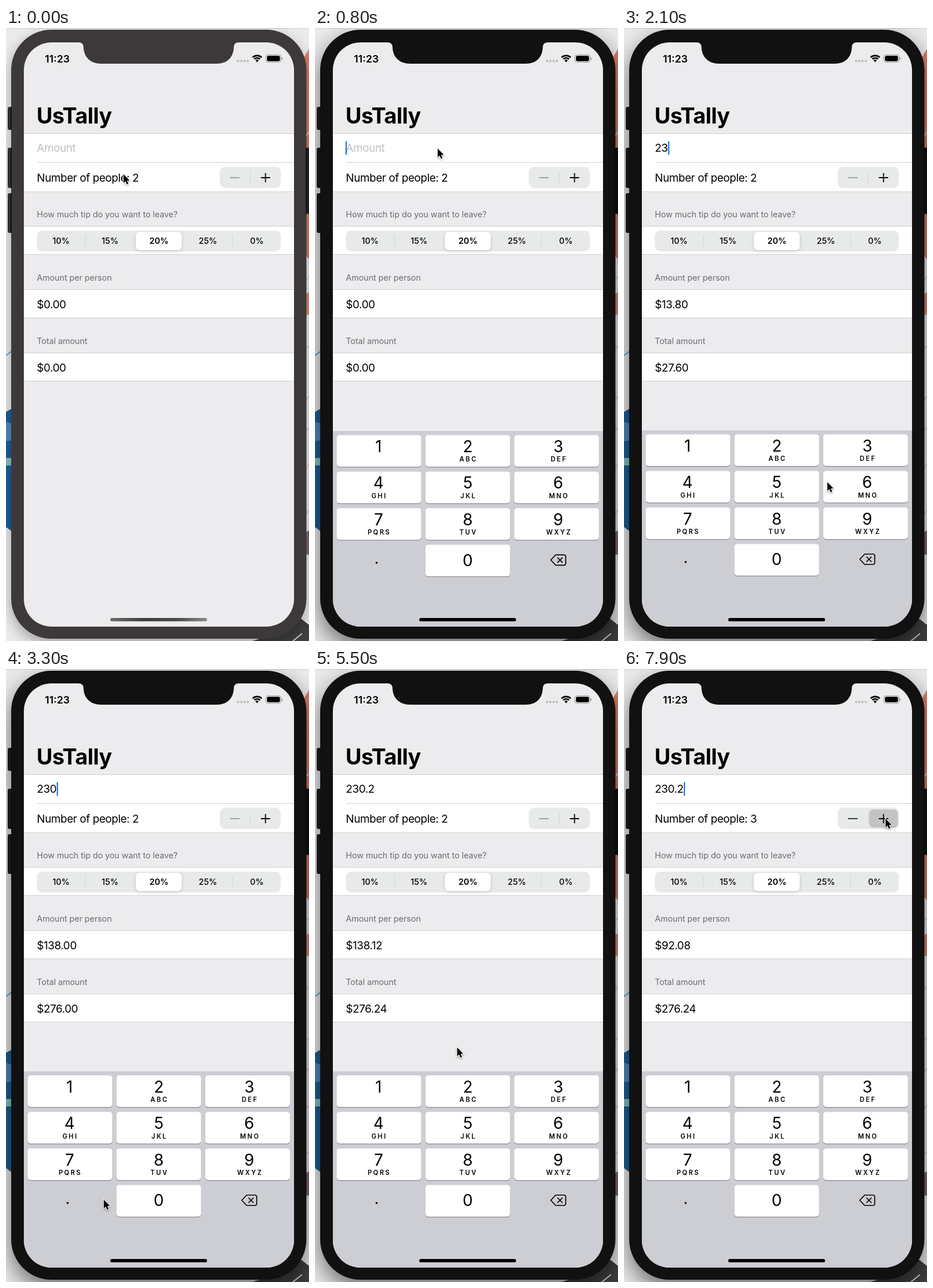
An HTML page with a canvas that plays this animation: 526 px wide and 1065 px high, repeating every 8 s.

```html
<!DOCTYPE html>
<html lang="en">
<head>
<meta charset="utf-8">
<title>Bill calculator</title>
<style>
  html, body { margin: 0; width: 100%; height: 100%; overflow: hidden; background: #d6d7d9; }
  canvas { display: block; }
</style>
</head>
<body>
<canvas id="stage" width="526" height="1065"></canvas>
<script>
const ctx = document.getElementById('stage').getContext('2d');
const LOOP = 8000, STEP = 100;
const LEFT = 31, RIGHT = 500, TOP = 25, BOTTOM = 1040;
const FOCUS = 200, KEYBOARD_START = 375.5, PLUS_DOWN = 7700, PLUS_UP = 7800;

// Pointer stops: time, x, y
const pointerPath = [
  [0, 204, 254], [200, 213, 209.5], [900, 213, 209.5], [1300, 250, 740], [1450, 250, 740],
  [1700, 392, 742], [1900, 392, 742], [2100, 353, 789], [2700, 262, 922], [2900, 262, 922],
  [3600, 110, 922], [4000, 110, 922], [4500, 214.5, 730.5], [5200, 214.5, 730.5],
  [6400, 421, 264], [6600, 421, 264], [7100, 454, 260]
];
const taps = [
  { key: '2', down: 1300, up: 1500 },
  { key: '3', down: 1700, up: 1900 },
  { key: '0', down: 2700, up: 2900 },
  { key: '.', down: 3800, up: 4000 },
  { key: '2', down: 4600, up: 4700 }
];
const clicks = [{ down: FOCUS, up: 300 }, ...taps, { down: PLUS_DOWN, up: PLUS_UP }];
const pad = [['1', ''], ['2', 'ABC'], ['3', 'DEF'], ['4', 'GHI'], ['5', 'JKL'], ['6', 'MNO'],
  ['7', 'PQRS'], ['8', 'TUV'], ['9', 'WXYZ'], ['.', ''], ['0', ''], ['back', '']];
const padLabelX = [110.3, 265.2, 422.3];

const isHeld = (tap, t) => t >= tap.down && t < tap.up;
const clamp = v => Math.max(0, Math.min(1, v));

function text(str, x, y, size, { weight = 400, color = '#000', align = 'left', track = 0 } = {}) {
  ctx.font = `${weight} ${size}px Inter, "Open Sans", sans-serif`;
  ctx.letterSpacing = track + 'px';
  ctx.textAlign = align;
  ctx.fillStyle = color;
  ctx.fillText(str, x, y);
  return ctx.measureText(str).width;
}
const bodyText = (str, y, color) => text(str, 53.5, y, 19, { color, track: -0.42 });

function box(x, y, w, h, color, r = 0) {
  ctx.fillStyle = color;
  ctx.beginPath();
  ctx.roundRect(x, y, w, h, r);
  ctx.fill();
}

function line(points, color, width = 1, close = false) {
  ctx.strokeStyle = color;
  ctx.lineWidth = width;
  ctx.beginPath();
  points.forEach(([x, y]) => ctx.lineTo(x, y));
  if (close) ctx.closePath();
  ctx.stroke();
}

function poly(points, color) {
  ctx.fillStyle = color;
  ctx.beginPath();
  points.forEach(([x, y]) => ctx.lineTo(x, y));
  ctx.fill();
}

function pointerAt(t) {
  const next = pointerPath.findIndex(p => p[0] > t);
  if (next < 0) return pointerPath.at(-1).slice(1);
  const [t0, x0, y0] = pointerPath[next - 1], [t1, x1, y1] = pointerPath[next];
  const u = (t - t0) / (t1 - t0), e = u * u * (3 - 2 * u);
  return [x0 + (x1 - x0) * e, y0 + (y1 - y0) * e];
}

// Critically damped spring
function keyboardTop(t) {
  const k = Math.max(0, t - KEYBOARD_START) / 1000 * 18.26;
  return 699 + (BOTTOM - 699) * (1 + k) * Math.exp(-k);
}

function caretAlpha(t) {
  if (t < FOCUS + 100) return 0;
  const lastEdit = taps.reduce((a, tap) => tap.up <= t ? tap.up : a, FOCUS + 100);
  if (t - lastEdit <= 600) return 1;
  const p = t % 1000;
  return p < 500 ? clamp((500 - p) / 300) : clamp((p - 600) / 300);
}

function drawDesktop() {
  box(0, 0, 526, 1065, '#ebebed');
  box(0, 0, 526, 1.5, '#d3dce4');
  line([[0, 569], [12, 560]], '#4fa9c8', 2);
  poly([[0, 667], [12, 660], [12, 876], [0, 867]], '#1b6099');
  poly([[0, 684], [12, 688], [12, 716], [0, 718]], '#4d8ac2');
  box(0, 747, 12, 13, '#86c3c6');
  poly([[526, 36], [512, 60], [512, 196], [526, 180]], '#dd7d63');
  poly([[526, 182], [512, 200], [512, 385], [526, 402]], '#d57a62');
  poly([[526, 459], [515, 466], [515, 500], [526, 498]], '#dc8a74');
  for (const y of [432, 552, 640, 694, 758, 838]) line([[518, y + 10], [526, y]], '#9d9da0');
  poly([[526, 873], [512, 880], [512, 914], [526, 915]], '#806971');
  poly([[428, 1065], [480, 1048], [512, 1026], [526, 1037], [526, 1065]], '#403f41');
  line([[498, 1065], [514, 1052]], '#d5d5d5', 2);
}

function drawPhone(active) {
  const shell = active ? '#111112' : '#3d393a';
  ctx.save();
  ctx.shadowColor = active ? 'rgba(0,0,0,.55)' : 'rgba(0,0,0,.32)';
  ctx.shadowBlur = active ? 40 : 24;
  ctx.shadowOffsetY = active ? 16 : 9;
  box(9, 3, 512.5, 1058, shell, 70);
  ctx.restore();
  const button = active ? '#19191a' : '#302e2f';
  for (const [y, h] of [[137, 40], [208, 70], [287, 69]]) {
    box(3, y, 7, h, button, [3, 0, 0, 3]);
    box(8, y, 1.5, h, '#0a0a0a');
  }
  box(520, 208, 6, 115, active ? '#0c0c0c' : '#1c1b1c');
  return shell;
}

function drawNotch(shell) {
  ctx.fillStyle = shell;
  ctx.beginPath();
  ctx.moveTo(126, 24);
  ctx.lineTo(126, 25);
  ctx.quadraticCurveTo(134, 25, 134.5, 33);
  ctx.bezierCurveTo(135, 51, 147, 62, 165, 62);
  ctx.lineTo(366, 62);
  ctx.bezierCurveTo(384, 62, 395, 51, 395.5, 33);
  ctx.quadraticCurveTo(396, 25, 404, 25);
  ctx.lineTo(404, 24);
  ctx.fill();
}

function drawStatus() {
  text('11:23', 89, 59.5, 17.8, { weight: 600, align: 'center' });
  for (let i = 0; i < 4; i++) box(401 + i * 5.6, 55.3, 4, 4, '#bcbcbe', 2);
  ctx.strokeStyle = '#000';
  ctx.lineWidth = 2.7;
  for (const r of [11.2, 7]) {
    ctx.beginPath();
    ctx.arc(436, 59, r, -Math.PI * 0.75, -Math.PI * 0.25);
    ctx.stroke();
  }
  ctx.fillStyle = '#000';
  ctx.beginPath();
  ctx.moveTo(436, 59.6);
  ctx.arc(436, 59, 4, -Math.PI * 0.75, -Math.PI * 0.25);
  ctx.fill();
  ctx.strokeStyle = '#98989a';
  ctx.lineWidth = 1.1;
  ctx.beginPath();
  ctx.roundRect(451, 46.5, 26.5, 13, 4);
  ctx.stroke();
  box(453, 48.3, 22.6, 9.4, '#000', 2.4);
  box(478.7, 51, 1.7, 4.5, '#98989a', [0, 2, 2, 0]);
}

function drawRow(y0, y1) {
  box(LEFT, y0, RIGHT - LEFT, y1 - y0, '#fff');
  for (const y of [y0, y1 - 1]) box(LEFT, y, RIGHT - LEFT, 1, '#cfcfd2');
}

function drawStepper(people, lit) {
  box(371, 241, 106, 37, '#e8eaea', 9);
  box(423.5, 250, 1, 19, '#d0d1d3');
  if (lit) box(425.5, 244, 50, 31.5, '#c3c3c5', 7);
  line([[389, 260], [405.5, 260]], people > 2 ? '#000' : '#87888a', 1.7);
  line([[442.5, 260], [458.5, 260]], '#000', 1.8);
  line([[450.5, 252], [450.5, 268]], '#000', 1.8);
}

function drawSegments() {
  box(53.5, 352, 423.5, 36, '#e8eaea', 9);
  for (const x of [137.5, 392.5]) box(x, 360, 1, 19, '#d0d1d3');
  ctx.save();
  ctx.shadowColor = 'rgba(0,0,0,.16)';
  ctx.shadowBlur = 6;
  ctx.shadowOffsetY = 2;
  box(225.5, 354, 79.5, 32, '#fff', 7);
  ctx.restore();
  ['10%', '15%', '20%', '25%', '0%'].forEach((label, i) =>
    text(label, 95.5 + i * 85, 375.2, 14.5, { weight: i === 2 ? 600 : 500, align: 'center', track: -0.1 }));
}

function drawForm(t) {
  const amount = taps.filter(tap => tap.up <= t).map(tap => tap.key).join('');
  const people = t >= PLUS_DOWN ? 3 : 2;
  const total = Number(amount) * 1.2;
  const money = v => '$' + v.toFixed(2);

  text('UsTally', 53, 166, 38, { weight: 700, track: -0.6 });
  [[183, 285], [344, 394], [454, 504], [564, 614]].forEach(r => drawRow(...r));
  box(54, 233, RIGHT - 54, 1, '#cfcfd2');

  const width = bodyText(amount || 'Amount', 215, amount ? '#000' : '#c0c0c2');
  ctx.globalAlpha = caretAlpha(t);
  box(amount ? 54 + width : 53, 196.5, 2.2, 24, '#1477e6', 1);
  ctx.globalAlpha = 1;

  bodyText('Number of people: ' + people, 267);
  drawStepper(people, t >= PLUS_DOWN);
  drawSegments();
  const heading = (str, y) => text(str, 53.5, y, 14.4, { color: '#6c6c70', track: -0.05 });
  heading('How much tip do you want to leave?', 329);
  heading('Amount per person', 439);
  heading('Total amount', 549);
  bodyText(money(total / people), 487);
  bodyText(money(total), 597);
}

function drawBackspace(x, y) {
  ctx.lineJoin = ctx.lineCap = 'round';
  line([[x - 13, y], [x - 4.5, y - 9], [x + 11, y - 9], [x + 13, y - 7], [x + 13, y + 7],
    [x + 11, y + 9], [x - 4.5, y + 9]], '#000', 1.7, true);
  line([[x - 1, y - 4], [x + 7, y + 4]], '#000', 1.7);
  line([[x + 7, y - 4], [x - 1, y + 4]], '#000', 1.7);
  ctx.lineJoin = 'miter';
  ctx.lineCap = 'butt';
}

function drawKeyboard(t) {
  const top = keyboardTop(t);
  if (top >= BOTTOM) return;
  box(LEFT, top, RIGHT - LEFT, BOTTOM - top, '#cdced3');
  pad.forEach(([digit, letters], i) => {
    const column = i % 3, mid = padLabelX[column];
    const x = 37.5 + column * 154.2, y = top + 7 + Math.floor(i / 3) * 63.5;
    const pressed = taps.some(tap => tap.key === digit && isHeld(tap, t));
    const plain = digit === '.' || digit === 'back';
    if (!plain || pressed) {
      box(x, y + 1.2, 147, 55, '#898a8e', 5);
      box(x, y, 147, 55, pressed && !plain ? '#b1b9cf' : '#fff', 5);
    }
    if (digit === '.') box(105.2, y + 29.5, 3.6, 3.6, '#000', 1.8);
    else if (digit === 'back') drawBackspace(mid, y + 26.5);
    else {
      text(digit, mid, y + (digit === '0' ? 36.8 : 29.7), 28, { align: 'center' });
      text(letters, mid + 1.3, y + 46, 11.2, { weight: 600, align: 'center', track: 2.5 });
    }
  });
}

function drawHomeBar(active) {
  let color = '#000';
  if (!active) {
    color = ctx.createLinearGradient(181, 0, 349, 0);
    color.addColorStop(0, '#6d6d6e');
    color.addColorStop(0.35, '#3d3d3e');
    color.addColorStop(0.7, '#4a4a4b');
    color.addColorStop(1, '#8b8d8c');
  }
  box(181, 1025, 168, 5.8, color, 3);
}

function drawPointer(t) {
  const [x, y] = pointerAt(t);
  if (clicks.some(c => isHeld(c, t))) {
    ctx.strokeStyle = '#0c0c0e';
    ctx.lineWidth = 1.6;
    ctx.beginPath();
    ctx.arc(x, y + 0.5, 24.6, 0, Math.PI * 2);
    ctx.stroke();
  }
  ctx.save();
  ctx.translate(x, y);
  ctx.beginPath();
  [[0, 0], [0, 15.2], [3.4, 12], [5.8, 17.6], [8.4, 16.5], [6, 11], [10.6, 10.8]]
    .forEach(p => ctx.lineTo(...p));
  ctx.closePath();
  ctx.shadowColor = 'rgba(0,0,0,.35)';
  ctx.shadowBlur = 3;
  ctx.shadowOffsetY = 1.5;
  ctx.strokeStyle = '#fff';
  ctx.lineWidth = 2;
  ctx.stroke();
  ctx.shadowColor = 'transparent';
  ctx.fillStyle = '#000';
  ctx.fill();
  ctx.restore();
}

function render(t) {
  const active = t >= FOCUS;
  drawDesktop();
  const shell = drawPhone(active);
  ctx.save();
  ctx.beginPath();
  ctx.roundRect(LEFT, TOP, RIGHT - LEFT, BOTTOM - TOP, 48);
  ctx.clip();
  box(LEFT, TOP, RIGHT - LEFT, BOTTOM - TOP, '#ececee');
  drawForm(t);
  drawKeyboard(t);
  drawStatus();
  drawHomeBar(t > KEYBOARD_START);
  drawNotch(shell);
  ctx.restore();
  drawPointer(t);
}

const start = performance.now();
function tick() {
  const t = (performance.now() - start) % LOOP;
  render(Math.floor(t / STEP) * STEP);
  requestAnimationFrame(tick);
}
tick();
</script>
</body>
</html>
```
